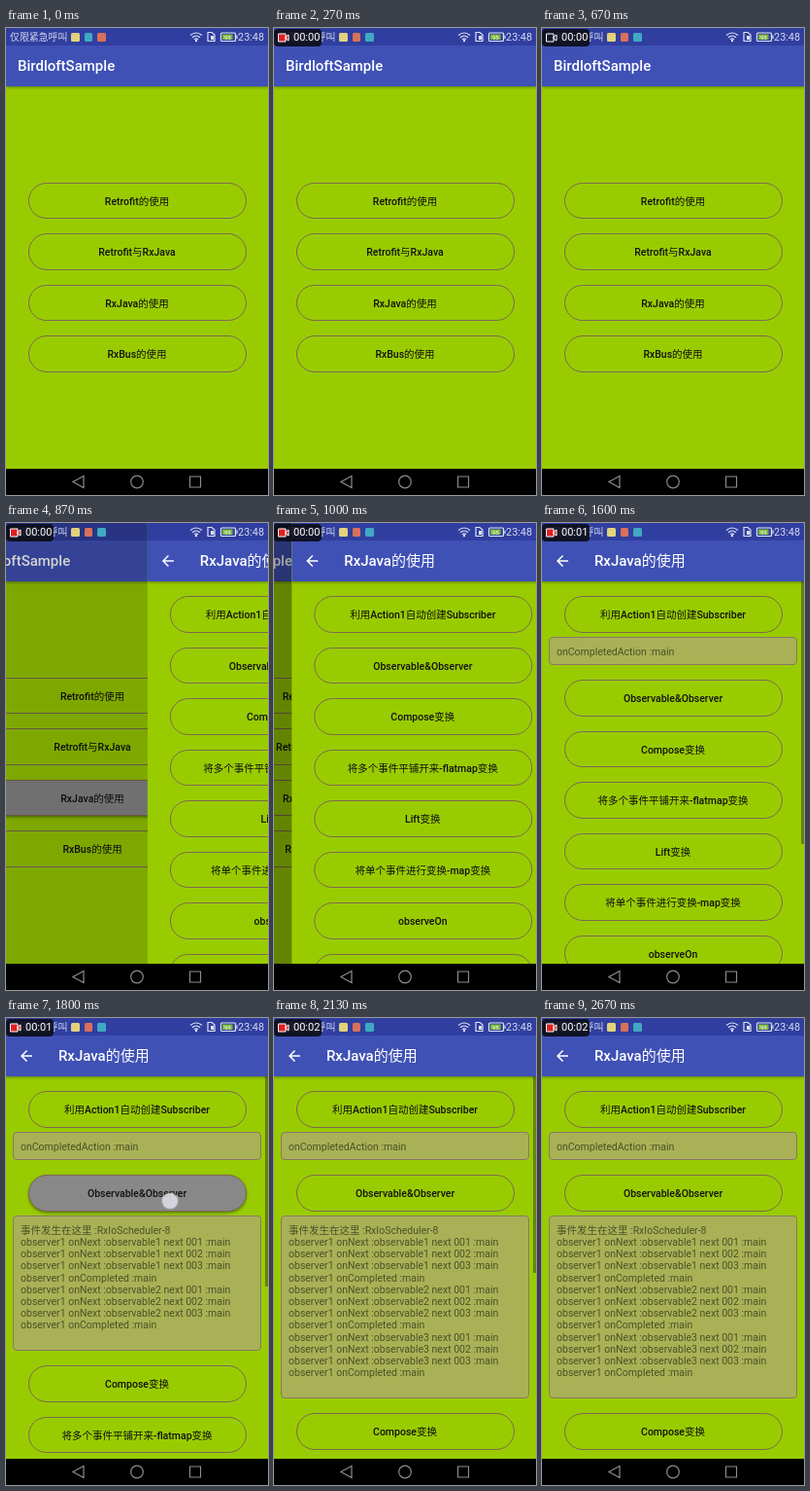
An HTML page for the animation above (2740 ms loop, 270 px wide and 480 px high).

```html
<!DOCTYPE html>
<html lang="zh">
<head>
<meta charset="utf-8">
<title>RxJava demo</title>
<style>
html, body { margin: 0; width: 100%; height: 100%; overflow: hidden; background: #000; }
#stage {
  position: relative; width: 270px; height: 480px; overflow: hidden;
  font: 10.5px/12.2px Roboto, 'Noto Sans CJK SC', 'Noto Sans CJK', sans-serif;
}
#stage div, #stage svg, #stage span { position: absolute; box-sizing: border-box; white-space: nowrap; }
.page { left: 0; top: 0; width: 270px; height: 453px; overflow: hidden; isolation: isolate; background: #9c0; }
.bar {
  left: 0; top: 0; width: 270px; height: 60px; z-index: 1;
  background: linear-gradient(#303f9f 18px, #3f51b5 18px);
  box-shadow: 0 1px 3px rgba(0, 0, 0, .4);
}
.title { top: 29px; font-weight: 500; font-size: 15px; line-height: 20px; color: #fff; }
.btn {
  left: 22.5px; width: 225px; height: 37.5px; border: 1px solid #7c6a50; border-radius: 19px;
  text-align: center; line-height: 37px; font-weight: 500; color: #111;
}
.btn.down { background: #888; box-shadow: 0 1.5px 3px rgba(0, 0, 0, .4); }
.log {
  left: 7px; width: 256px; padding: 8.5px 7px; overflow: hidden;
  border: 1px solid #8a7668; border-radius: 4px; background: #a9b156; color: #4b5126;
}
#stage .log { white-space: pre; }
#dim { inset: 0; z-index: 2; background: #000; }
#thumb { right: 0; top: 60px; width: 3px; background: rgba(70, 90, 20, .62); }
#dot {
  width: 16px; height: 16px; margin: -8px; border-radius: 50%;
  background: rgba(225, 225, 235, .85); box-shadow: 0 0 2px rgba(255, 255, 255, .6);
}
.tile { top: 5px; width: 8.5px; height: 8.5px; border-radius: 1.5px; }
.status { top: 3px; line-height: 13px; color: #d6daf0; }
#rec { left: 0; top: 1px; width: 49px; height: 18px; border-radius: 4px; background: rgba(12, 12, 20, .87); }
#clock { left: 20px; top: 2px; font-size: 11px; line-height: 14px; color: #fff; }
#nav { left: 0; top: 453px; width: 270px; height: 27px; background: #000; }
</style>
</head>
<body>
<div id="stage">
  <div class="page" id="home">
    <div class="bar"><span class="title" id="homeTitle" style="left:12px">BirdloftSample</span></div>
    <div id="homeList"></div>
    <div id="dim"></div>
  </div>
  <div class="page" id="demo">
    <div class="bar">
      <svg style="left:12px;top:30px" width="18" height="18" viewBox="0 0 24 24"><path fill="#fff" d="M20 11H7.8l5.6-5.6L12 4l-8 8 8 8 1.4-1.4L7.8 13H20z"/></svg>
      <span class="title" style="left:54px">RxJava的使用</span>
    </div>
    <div id="demoList"></div>
    <div id="thumb"></div>
  </div>
  <div id="dot"></div>

  <span class="status" style="left:4px;font-size:9.9px">仅限紧急呼叫</span>
  <div class="tile" style="left:67px;background:#e2d27c"></div>
  <div class="tile" id="tileA" style="left:80.5px"></div>
  <div class="tile" id="tileB" style="left:94px"></div>
  <svg style="left:186px;top:0" width="54" height="18" fill="none" stroke="#dfe2f4" stroke-width="1.2">
    <path d="M4 7.5Q10 2.5 16 7.5M6 9.7Q10 6.3 14 9.7M8 11.6Q10 10 12 11.6"/>
    <circle cx="10" cy="13" r=".6"/>
    <path d="M22 4.5h4l3 2.5v6.5h-7z"/>
    <rect x="25" y="8" width="3" height="4" fill="#dfe2f4" stroke="none"/>
    <rect x="35.5" y="5" width="15" height="8.5" rx="1"/>
    <rect x="37" y="6.5" width="10.5" height="5.5" fill="#7cb83c" stroke="none"/>
    <path d="M52 7.5v3.5"/>
    <text x="39" y="11.7" font-size="6" fill="#fff" stroke="none">95</text>
  </svg>
  <span class="status" style="right:4px;font-size:10.8px">23:48</span>

  <div id="rec">
    <svg style="left:3px;top:3px" width="14" height="12" stroke="#fff" stroke-width="1">
      <path id="cam" d="M1.5 2h7.5v8h-7.5zM9 5l3-2v6l-3-2z"/>
    </svg>
    <span id="clock"></span>
  </div>

  <div id="nav">
    <svg width="270" height="27" fill="none" stroke="#8c8c8c" stroke-width="1.2">
      <path d="M80 7.5v12l-11-6zM189.5 8h11v11h-11z"/><circle cx="135" cy="13.5" r="6.3"/>
    </svg>
  </div>
</div>
<script>
const $ = id => document.getElementById(id);
const LOOP = 2740, FPS = 15;

function add(parent, cls, text = '') {
  const el = document.createElement('div');
  el.className = cls;
  el.textContent = text;
  return $(parent).appendChild(el);
}

const homeBtns = ['Retrofit的使用', 'Retrofit与RxJava', 'RxJava的使用', 'RxBus的使用']
  .map(s => add('homeList', 'btn', s));
homeBtns.forEach((b, i) => b.style.top = 158.8 + i * 52.5 + 'px');

const demoBtns = ['利用Action1自动创建Subscriber', 'Observable&Observer', 'Compose变换',
  '将多个事件平铺开来-flatmap变换', 'Lift变换', '将单个事件进行变换-map变换', 'observeOn', 'subscribeOn']
  .map(s => add('demoList', 'btn', s));
const logs = [add('demoList', 'log', 'onCompletedAction :main'), add('demoList', 'log')];

const events = ['事件发生在这里 :RxIoScheduler-8'];
for (let o = 1; o <= 3; o++) {
  for (let n = 1; n <= 3; n++) events.push(`observer1 onNext :observable${o} next 00${n} :main`);
  events.push('observer1 onCompleted :main');
}

// Each tap: button, pressed from / to, pointer position and its last moment
const taps = [
  { btn: homeBtns[2], from: 720, to: 920, x: 152, y: 284, lift: 850 },
  { btn: demoBtns[0], from: 1190, to: 1450, x: 177, y: 94, lift: 1390 },
  { btn: demoBtns[1], from: 1660, to: 1920, x: 169, y: 188, lift: 1860 }
];

const show = (el, on) => el.style.visibility = on ? 'visible' : 'hidden';
const shift = (el, x) => el.style.transform = `translateX(${x}px)`;
const clamp = v => Math.min(1, Math.max(0, v));

function layout(t) {
  const batches = Math.max(0, Math.min(3, Math.floor((t - 1660) / (1000 / FPS))));
  const count = batches ? 1 + 4 * batches : 0;
  logs[1].textContent = events.slice(0, count).join('\n');
  const rows = [t > 1390 ? 1 : 0, count ? count + 1 : 0];
  let y = 75;
  demoBtns.forEach((b, i) => {
    b.style.top = y + 'px';
    y += 37.5;
    if (i < 2) {
      show(logs[i], rows[i]);
      if (rows[i]) {
        const h = rows[i] * 12.2 + 17;
        logs[i].style.top = y + 4.5 + 'px';
        logs[i].style.height = h + 'px';
        y += 4.5 + h;
      }
    }
    y += 15;
  });
  // Thumb length follows the content height
  $('thumb').style.height = 393 * 393 / (y + 43) + 'px';
  $('thumb').style.opacity = 1 - clamp((t - 2250) / 250);
}

function render(t) {
  const left = Math.pow(1 - clamp((t - 800) / 300), 2.45);
  shift($('demo'), 270 * left);
  shift($('homeList'), -100 * (1 - left));
  shift($('homeTitle'), -100 * (1 - left));
  $('dim').style.opacity = .38 * (1 - left);

  layout(t);

  for (const p of taps) p.btn.classList.toggle('down', t > p.from && t < p.to);
  const tap = taps.find(p => t > p.from && t < p.lift);
  show($('dot'), tap);
  if (tap) Object.assign($('dot').style, { left: tap.x + 'px', top: tap.y + 'px' });

  const on = t > 60;
  show($('rec'), on);
  $('tileA').style.background = on ? '#d9705a' : '#3fa9c4';
  $('tileB').style.background = on ? '#3fa9c4' : '#d9705a';
  $('clock').textContent = '00:0' + Math.max(0, Math.floor((t - 60) / 1000));
  const blink = t % 600;
  $('cam').setAttribute('fill', blink > 10 && blink < 255 ? 'none' : '#e02020');
}

const start = performance.now();
function tick() {
  const t = (performance.now() - start) % LOOP;
  render(Math.floor(t * FPS / 1000 + .06) * 1000 / FPS);
  requestAnimationFrame(tick);
}
tick();
</script>
</body>
</html>
```
